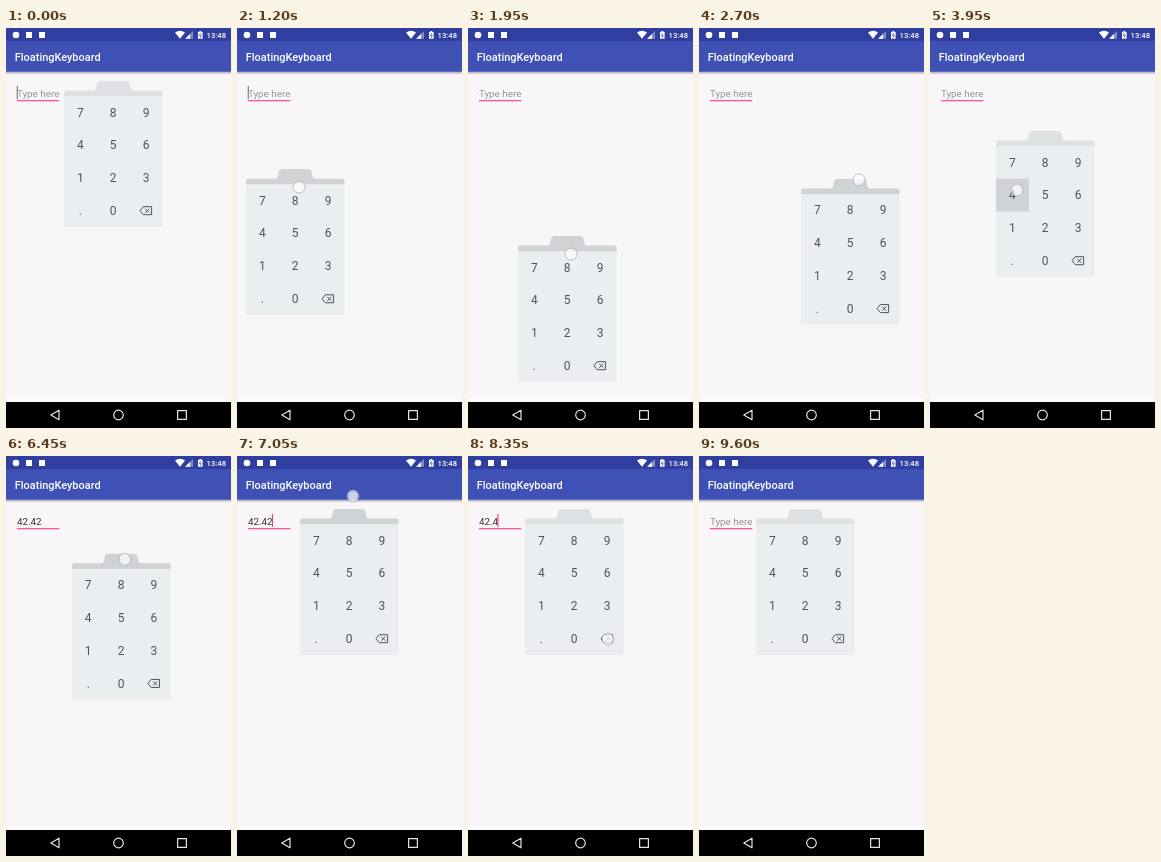
Animation, 225 px wide and 400 px high, one loop 9650 ms. Source, as an HTML page:

```html
<!DOCTYPE html>
<html lang="en">
<head>
<meta charset="utf-8">
<title>Floating keyboard</title>
<style>
  html, body { margin: 0; width: 100%; height: 100%; overflow: hidden; background: #f8f6f9; }
  svg { display: block; width: 225px; height: 400px; font-family: Roboto, sans-serif; }
  .bold { font-weight: 500; fill: #fff; }
  .field { font-size: 9.85px; }
  #keys text { font-size: 12px; fill: #505356; text-anchor: middle; }
</style>
</head>
<body>
<svg viewBox="0 0 225 400">
  <defs>
    <linearGradient id="shade" x2="0" y2="1">
      <stop offset="0" stop-color="#000" stop-opacity=".3"/>
      <stop offset="1" stop-color="#000" stop-opacity="0"/>
    </linearGradient>
  </defs>
  <rect width="225" height="400" fill="#f8f6f9"/>
  <rect y="370.5" width="225" height="4" fill="#fdfcfe"/>

  <!-- text field -->
  <rect x="10.9" y="72" width="42.4" height="1.3" fill="#ff5592"/>
  <text id="value" class="field" x="10.9" y="68.5"></text>
  <rect id="caret" y="58" width="1.1" height="13"/>

  <!-- toolbar and status bar -->
  <rect y="43.8" width="225" height="3" fill="url(#shade)"/>
  <rect y="13" width="225" height="30.8" fill="#3f51b5"/>
  <rect width="225" height="13.1" fill="#303f9f"/>
  <text class="bold" x="8.8" y="32.8" font-size="10.94">FloatingKeyboard</text>
  <g fill="#fff">
    <circle cx="10" cy="7" r="3.3"/>
    <rect x="20" y="4" width="6" height="6"/>
    <rect x="33" y="4" width="6" height="6"/>
    <path d="M169 4.6Q174 1 179 4.6L174 10.8Z"/>
    <path d="M187 3V10.8H179.2Z" opacity=".4"/>
    <path d="M184 6V10.8H179.2Z"/>
    <path d="M192 4H193.3V3.1H195.3V4H196.6V10.8H192Z"/>
  </g>
  <path d="M194.6 5L193.3 7.6H195.3L194 10" fill="none" stroke="#303f9f" stroke-width=".7"/>
  <text class="bold" x="200.6" y="9.7" font-size="7.66">13:48</text>

  <!-- keyboard -->
  <g id="board">
    <rect y="14.5" width="98.6" height="131.5" fill="#ebeef0"/>
    <path id="handle" d="M0 15.2V12Q0 9.6 2.4 9.6H29Q31.5 9.6 32 7.5L33 2.5Q33.6 0 36 0H62.4Q65 0 65.5 2.5L66.5 7.5Q67 9.6 69.4 9.6H96.2Q98.6 9.6 98.6 12V15.2Z"/>
    <rect id="press" width="32.8" height="32.8" fill="#cfd2d6"/>
    <g id="keys"></g>
  </g>

  <g id="touch">
    <circle r="6" fill="#fff" fill-opacity=".62" stroke="#8c93ab" stroke-opacity=".6" stroke-width=".9"/>
    <circle r="4" fill="#fff" fill-opacity=".3"/>
  </g>

  <!-- navigation bar -->
  <rect y="374" width="225" height="26" fill="#000"/>
  <g fill="none" stroke="#e4e4e4" stroke-width="1.2" stroke-linejoin="round">
    <path d="M53 382.2V391.8L44.8 387Z"/>
    <circle cx="112.5" cy="387" r="4.8"/>
    <rect x="171.6" y="382.6" width="8.8" height="8.8"/>
  </g>
</svg>

<script>
const LOOP = 9650, CELL = 32.8, KEYS_TOP = 14.9, BLINK = 500;
const LAYOUT = '789456123.0<';
const $ = id => document.getElementById(id);
const cell = i => [i % 3 * CELL, KEYS_TOP + Math.floor(i / 3) * CELL];

// time, x, y of the keyboard's top left corner
const path = [
  [150, 58, 53], [1200, 9, 141], [1950, 50, 208],
  [2300, 50, 208], [2430, 66, 216], [2700, 102, 151], [3350, 66, 103],
  [6300, 66, 103], [7050, 63, 53], [7350, 57, 53]
];

// start, end, finger offset from the keyboard corner (time, dx, dy)
const drags = [
  [150, 2000, [[150, 53, 18]]],
  [2300, 3480, [[2300, 58, 1]]],
  [6300, 7420, [[6300, 53, 6], [6650, 53, 4], [7050, 53, -13], [7350, 53, -20]]]
];

// press, release, key, finger x, y
const taps = [
  [3950, 4100, '4', 87, 162],
  [4300, 4400, '2', 118, 198],
  [4800, 4900, '.', 86, 230],
  [5250, 5350, '4', 91, 166],
  [5500, 5600, '2', 117, 199]
];
for (let i = 0; i < 5; i++) taps.push([8250 + i * 190, 8340 + i * 190, '<', 140, 183]);

$('keys').innerHTML = [...LAYOUT].map((key, i) => {
  const [x, y] = cell(i), cx = x + CELL / 2, cy = y + CELL / 2;
  return key === '<'
    ? `<path transform="translate(${cx} ${cy})" d="M-6 0L-2.7-4H5.6V4H-2.7ZM-.7-2L3.3 2M3.3-2L-.7 2" fill="none" stroke="#505356"/>`
    : `<text x="${cx}" y="${cy + 4.2}">${key}</text>`;
}).join('');

// smooth interpolation without overshoot
function sample(rows, t, col) {
  const last = rows.length - 1;
  if (t <= rows[0][0]) return rows[0][col];
  if (t >= rows[last][0]) return rows[last][col];
  const i = rows.findIndex(r => r[0] > t) - 1;
  const slope = k => (rows[k + 1][col] - rows[k][col]) / (rows[k + 1][0] - rows[k][0]);
  const tangent = k => {
    if (k === 0 || k === last) return 0;
    const a = slope(k - 1), b = slope(k);
    return a * b > 0 ? 2 * a * b / (a + b) : 0;
  };
  const [p, q] = [rows[i], rows[i + 1]], d = q[0] - p[0], u = (t - p[0]) / d, v = 1 - u;
  return p[col] * (1 + 2 * u) * v * v + q[col] * (3 - 2 * u) * u * u
    + d * (tangent(i) * u * v * v - tangent(i + 1) * u * u * v);
}

function move(el, x, y) {
  el.setAttribute('transform', `translate(${x.toFixed(2)} ${y.toFixed(2)})`);
}

function show(el, opacity) {
  el.setAttribute('opacity', opacity);
}

function draw(t) {
  const x = sample(path, t, 1), y = sample(path, t, 2);
  const drag = drags.find(d => t >= d[0] && t < d[1]);
  const tap = taps.findLast(k => t >= k[0] && t < k[1] + 100);
  const held = tap && t < tap[1];

  move($('board'), x, y);
  $('handle').setAttribute('fill', drag ? '#cfd3d6' : '#dde1e3');
  show($('press'), held ? 1 : 0);
  if (held) move($('press'), ...cell(LAYOUT.indexOf(tap[2])));

  show($('touch'), drag || held ? 1 : tap ? 1 - (t - tap[1]) / 200 : 0);
  if (drag) move($('touch'), x + sample(drag[2], t, 1), y + sample(drag[2], t, 2));
  else if (tap) move($('touch'), tap[3], tap[4]);

  let text = '', edited = 50;
  for (const [, end, key] of taps) {
    if (t < end) break;
    text = key === '<' ? text.slice(0, -1) : text + key;
    edited = end;
  }
  const value = $('value'), shown = text || 'Type here';
  if (value.textContent !== shown) value.textContent = shown;
  value.setAttribute('fill', text ? '#333' : '#969497');

  const caret = $('caret');
  caret.setAttribute('x', 10.7 + (text ? value.getComputedTextLength() - .5 : 0));
  caret.setAttribute('fill', text ? '#e8407c' : '#77707a');
  show(caret, Math.floor(Math.max(0, t - edited) / BLINK) % 2 ? 0 : 1);
}

const start = performance.now();
function tick() {
  draw((performance.now() - start) % LOOP);
  requestAnimationFrame(tick);
}
tick();
</script>
</body>
</html>
```
